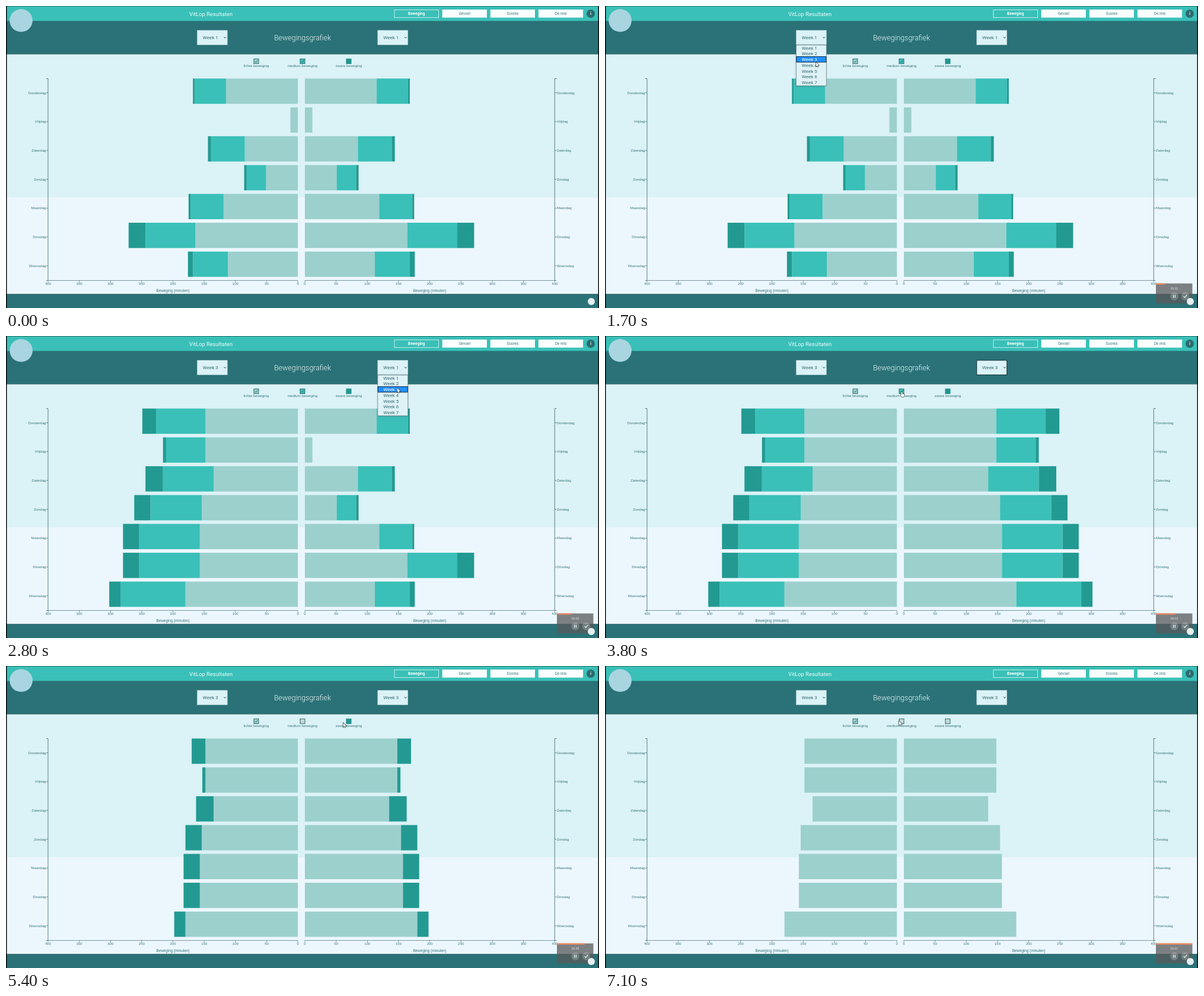
An HTML page with a canvas for the animation above (7.2 s loop, 1000 by 510 pixels).

```html
<!DOCTYPE html>
<html lang="nl">
<head>
<meta charset="utf-8">
<title>Bewegingsgrafiek</title>
<style>
html, body { margin: 0; width: 100%; height: 100%; overflow: hidden; background: #000; }
canvas { display: block; width: 1000px; height: 510px; }
</style>
</head>
<body>
<canvas id="stage"></canvas>
<script>
const LOOP = 7200, STEP = 100, MOVE = 600;
const SANS = '"Liberation Sans", Arial, sans-serif';
const ROBOTO = 'Roboto, sans-serif';
const DARK = '#2a7277', TEAL = '#3ac0b8', DEEP = '#229a92', SOFT = '#9cd0cd', PALE = '#dbf2f6';
const AXIS = '#4b7276', INK = '#37777b';
const TOP = 122.5, ROW = 48.7, BAR = 42.7, BASE = 463.5, UNIT = 421.3 / 400;
const LEFT = { x: 322.3, zero: 492.2, dir: -1 }, RIGHT = { x: 626.8, zero: 504, dir: 1 };

// minutes per kind of movement, one value per day
const DAYS = ['Donderdag', 'Vrijdag', 'Zaterdag', 'Zondag', 'Maandag', 'Dinsdag', 'Woensdag'];
const KINDS = [
  { name: 'lichte', color: SOFT, week1: [115, 12, 85, 51, 119, 164, 112], week3: [148, 148, 135, 154, 157, 157, 180] },
  { name: 'medium', color: TEAL, week1: [50, 0, 54, 31, 53, 80, 56], week3: [79, 63, 81, 82, 97, 97, 104] },
  { name: 'zware', color: DEEP, week1: [3, 0, 5, 4, 3, 27, 8], week3: [22, 5, 28, 26, 26, 26, 18] }
];

// the pointer rests at each stop around its time; most stops are clicks
const STOPS = {
  enter: { at: 200, x: 640, y: 330 },
  openLeft: { at: 1100, x: 352, y: 55 },
  pickLeft: { at: 1800, x: 356, y: 95 },
  openRight: { at: 2500, x: 655, y: 55 },
  pickRight: { at: 2900, x: 660, y: 88 },
  medium: { at: 3981, x: 500, y: 94 },
  heavy: { at: 5600, x: 569, y: 96 },
  leave: { at: LOOP, x: 496, y: 93 }
};

const canvas = document.getElementById('stage');
const c = canvas.getContext('2d');
const ratio = window.devicePixelRatio || 1;
canvas.width = 1000 * ratio;
canvas.height = 510 * ratio;

function rect(x, y, w, h, fill) {
  c.fillStyle = fill;
  c.fillRect(x, y, w, h);
}

function frame(x, y, w, h, color, width = 1) {
  c.strokeStyle = color;
  c.lineWidth = width;
  c.strokeRect(x, y, w, h);
}

function line(points, color, width) {
  c.beginPath();
  points.forEach(([x, y]) => c.lineTo(x, y));
  c.strokeStyle = color;
  c.lineWidth = width;
  c.stroke();
}

function disc(x, y, r, fill) {
  c.beginPath();
  c.arc(x, y, r, 0, Math.PI * 2);
  c.fillStyle = fill;
  c.fill();
}

function text(str, x, y, size, color, align = 'left', family = SANS, weight = 400) {
  c.font = `${weight} ${size}px ${family}`;
  c.textAlign = align;
  c.fillStyle = color;
  c.fillText(str, x, y);
}

function ease(t, start, span = MOVE) {
  const p = Math.min(1, Math.max(0, (t - start) / span));
  return p < 0.5 ? 4 * p ** 3 : 1 - 4 * (1 - p) ** 3;
}

const past = (t, stop) => t >= STOPS[stop].at;
const during = (t, from, to) => past(t, from) && !past(t, to);

function page() {
  rect(0, 0, 1000, 510, '#000');
  rect(1.4, 0.4, 997.2, 25.4, TEAL);
  rect(1.4, 25.5, 997.2, 56, DARK);
  rect(1.4, 81.5, 997.2, 241.5, PALE);
  rect(1.4, 323, 997.2, 163.5, '#ecf7fd');
  rect(1.4, 486.5, 997.2, 23.5, DARK);
  disc(25.5, 24.5, 19.3, '#a9d5e0');

  text('VitLop Resultaten', 309, 16.7, 9.3, '#eefafa', 'left', ROBOTO);
  text('Bewegingsgrafiek', 500, 57.8, 12.4, '#eaf6f7', 'center', ROBOTO, 300);
  ['Beweging', 'Gevoel', 'Scores', 'De reis'].forEach((name, i) => {
    const x = 654.6 + i * 81.1, active = i === 0;
    if (active) frame(x + 0.4, 6.4, 74.6, 13.2, '#e4f7f6', 0.8);
    else rect(x, 6, 75.2, 13.6, '#fbfefe');
    text(name, x + 37.6, 15.2, 6.4, active ? '#fff' : INK, 'center', ROBOTO, active ? 700 : 400);
  });
  disc(986, 13, 7, '#2b6b70');
  text('i', 986, 15.4, 6.5, '#fff', 'center', ROBOTO, 700);
}

function select(x, week, focus) {
  rect(x, 41, 51, 24.7, PALE);
  frame(x, 41, 51, 24.7, focus ? '#14363a' : '#a9c9cc', focus ? 1.1 : 0.5);
  text('Week ' + week, x + 9.4, 56.2, 8, '#356b70', 'left', ROBOTO);
  line([[x + 45.2, 52.3], [x + 47, 54.3], [x + 48.8, 52.3]], '#24484b', 1);
}

function menu(x, t, opened) {
  const active = 1 + Math.round(2 * Math.min(1, (t - opened) / 300));
  c.save();
  c.shadowColor = 'rgba(0,0,0,.35)';
  c.shadowBlur = 3 * ratio;
  rect(x, 66, 51, 68.8, '#dff2f6');
  c.restore();
  frame(x, 66, 51, 68.8, '#71868a', 0.8);
  for (let n = 1; n <= 7; n++) {
    const mid = 61 + n * 9.72;
    if (n === active) {
      rect(x + 0.5, mid - 4.7, 50, 9.4, '#1e90ff');
      frame(x + 0.5, mid - 4.7, 50, 9.4, '#10263c');
    }
    text('Week ' + n, x + 9.4, mid + 2.9, 8, n === active ? '#fff' : '#356b70', 'left', ROBOTO);
  }
}

function picker(side, t, open, pick, next) {
  select(side.x, past(t, pick) ? 3 : 1, during(t, pick, next));
  if (during(t, open, pick)) menu(side.x, t, STOPS[open].at);
}

function legend(t) {
  const on = [true, !past(t, 'medium'), !past(t, 'heavy')];
  KINDS.forEach(({ name, color }, i) => {
    const x = 422 + i * 78, filled = on[i] && color === DEEP;
    rect(x - 4, 89.3, 8, 8, on[i] ? color : '#c4d8d9');
    frame(x - 4, 89.3, 8, 8, filled ? '#1f8983' : '#31696d');
    if (on[i]) line([[x - 2.2, 93.4], [x - 0.6, 95.2], [x + 2.5, 91.3]], filled ? '#1c847d' : '#2f7478', 1);
    text(name + ' beweging', x, 103.3, 6.2, INK, 'center');
  });
}

function chart({ zero, dir }, mix, keep) {
  const end = zero + dir * 400 * UNIT;
  DAYS.forEach((day, row) => {
    const y = TOP + row * ROW, mid = y + ROW / 2 - 0.3;
    let x = zero;
    KINDS.forEach(({ color, week1, week3 }, k) => {
      const w = dir * UNIT * keep[k] * (week1[row] + (week3[row] - week1[row]) * mix);
      rect(x, y, w, BAR, color);
      x += w;
    });
    line([[end, mid], [end + dir * 3, mid]], AXIS, 0.8);
    text(day, end + dir * 3.6, mid + 2.1, 6, INK, dir > 0 ? 'left' : 'right');
  });
  line([[end + dir * 3, TOP], [end, TOP], [end, BASE], [end + dir * 3, BASE]], AXIS, 0.9);
  line([[zero, BASE], [end, BASE]], AXIS, 0.7);
  for (let v = 0; v <= 400; v += 50) {
    const x = zero + dir * v * UNIT;
    line([[x, BASE], [x, BASE + 3]], AXIS, 0.7);
    text(v, x, 471.2, 6, INK, 'center');
  }
  text('Beweging (minuten)', (zero + end) / 2, 482.5, 6.3, INK, 'center');
}

function recorder(t) {
  const glass = 'rgba(255,255,255,.2)', y = 490.2;
  rect(929, 468.5, 61.5, 33.8, 'rgba(88,88,90,.75)');
  rect(929, 468.2, 61.5 * t / (LOOP - STEP), 2.3, '#f08a63');
  text('00:0' + Math.floor(t / 1000), 960, 479, 5, '#e0e3e3', 'center');
  for (const s of [-2.5, 2.5]) line([[941 - s, y - 2.5], [941 + s, y + 2.5]], '#565c5e', 0.8);
  disc(960, y, 6.8, glass);
  disc(978.5, y, 6.8, glass);
  for (const x of [958, 960.8]) rect(x, y - 2.5, 1.2, 5, '#f4f5f5');
  line([[975.8, y], [977.7, y + 2.2], [981.4, y - 2.3]], '#f4f5f5', 1.1);
}

function arrow() {
  c.beginPath();
  [[0, 0], [0, 7], [1.6, 5.6], [2.6, 8], [3.7, 7.5], [2.7, 5.2], [4.8, 5]].forEach(([x, y]) => c.lineTo(x, y));
  c.closePath();
}

function hand() {
  c.beginPath();
  c.roundRect(-0.8, 0, 1.7, 6, 0.8);
  c.roundRect(-1.4, 3.8, 5.6, 5, 1.6);
}

function pointer(t) {
  const stops = Object.values(STOPS);
  if (t <= stops[0].at) return;
  const i = stops.findIndex(s => t < s.at);
  const a = stops[i - 1], b = stops[i];
  const s = ease(t, a.at + 100, b.at - a.at - 200);
  const x = a.x + (b.x - a.x) * s, y = a.y + (b.y - a.y) * s;
  const goal = STOPS.medium;
  c.save();
  c.translate(x, y);
  if (Math.hypot(x - goal.x, y - goal.y) < 3) hand(); else arrow();
  c.strokeStyle = '#243436';
  c.lineWidth = 1.3;
  c.stroke();
  c.fillStyle = '#fff';
  c.fill();
  c.restore();
}

function draw(t) {
  c.setTransform(ratio, 0, 0, ratio, 0, 0);
  page();
  legend(t);
  const keep = [1, 1 - ease(t, STOPS.medium.at), 1 - ease(t, STOPS.heavy.at)];
  chart(LEFT, ease(t, STOPS.pickLeft.at), keep);
  chart(RIGHT, ease(t, STOPS.pickRight.at), keep);
  picker(LEFT, t, 'openLeft', 'pickLeft', 'openRight');
  picker(RIGHT, t, 'openRight', 'pickRight', 'medium');
  if (t >= STEP) recorder(t);
  disc(987, 499, 6, '#e6eff0');
  pointer(t);
}

const begin = performance.now();
function tick() {
  const t = (performance.now() - begin) % LOOP;
  draw(Math.floor(t / STEP) * STEP);
  requestAnimationFrame(tick);
}
tick();
</script>
</body>
</html>
```
